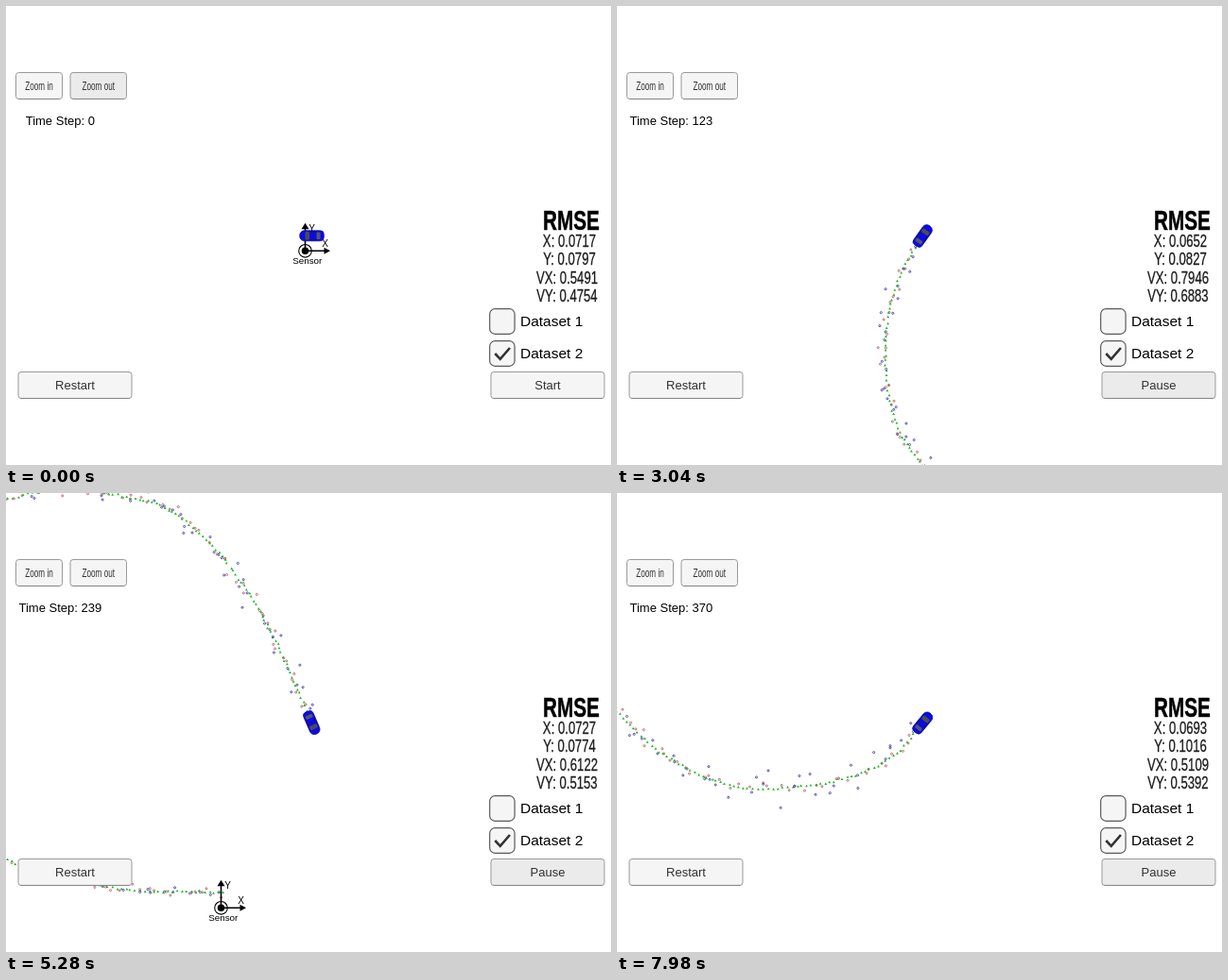
Write an HTML page with a canvas that moves like this. It is 640 by 486 pixels and loops after 8000 ms.

```html
<!DOCTYPE html>
<html lang="en">
<head>
<meta charset="utf-8">
<title>Sensor fusion tracker</title>
<style>
html, body { margin: 0; width: 100%; height: 100%; overflow: hidden; background: #fff; }
canvas { display: block; width: 640px; height: 486px; }
</style>
</head>
<body>
<canvas id="stage" width="640" height="486"></canvas>
<script>
const ctx = document.getElementById('stage').getContext('2d');
const LOOP = 8000, LAST = 370, CAR = [323.5, 243.3], INK = '#323232';
const FONT = '"Liberation Sans", Arial, sans-serif';

// Read-outs: time in ms, step, then errors in x, y, vx, vy
const READINGS = [
  [460, 0, .04, .06, 1.35, 1.15],
  [2120, 78, .0597, .0850, .9001, .7832],
  [3960, 168, .0707, .0804, .6893, .5937],
  [5280, 239, .0727, .0774, .6122, .5153],
  [5960, 272, .0724, .0775, .5790, .4873],
  [7120, 325, .0707, .0872, .5371, .4902],
  [7980, LAST, .0693, .1016, .5109, .5392]
];
const IDLE = [.0717, .0797, .5491, .4754];

// Bends of the road: step, then position relative to the sensor
const BENDS = [
  [0, 7, -16], [26, -120, -22], [49, -230, -54], [78, -337, -146], [100, -357, -256],
  [119, -329, -346], [138, -262, -415], [155, -179, -443], [168, -114, -438],
  [183, -48, -417.5], [206, 27, -337], [239, 96, -196], [272, 152, -46], [293, 206, 45],
  [308, 260, 100], [325, 334, 136], [336, 391, 139], [350, 459, 128], [361, 508, 105], [LAST, 539, 70]
];

const lerp = (a, b, u) => a + (b - a) * u;
const clamp01 = u => Math.max(0, Math.min(1, u));

function spanAt(keys, at) {
  let i = 0;
  while (i < keys.length - 2 && at > keys[i + 1][0]) i++;
  const [start, end] = [keys[i][0], keys[i + 1][0]];
  return { i, u: clamp01((at - start) / (end - start)), length: end - start };
}

function reading(t, col) {
  const { i, u } = spanAt(READINGS, t);
  return lerp(READINGS[i][col], READINGS[i + 1][col], u);
}

function slope(i, col) {
  const a = BENDS[Math.max(0, i - 1)], b = BENDS[Math.min(BENDS.length - 1, i + 1)];
  return (b[col] - a[col]) / (b[0] - a[0]);
}

// Cubic Hermite curve through the bends
function place(step) {
  const { i, u, length } = spanAt(BENDS, step), v = 1 - u;
  return [1, 2].map(col =>
    v * v * (1 + 2 * u) * BENDS[i][col] + u * u * (1 + 2 * v) * BENDS[i + 1][col] +
    length * u * v * (v * slope(i, col) - u * slope(i + 1, col)));
}

let seed = 20177;
function random() {
  seed = (seed * 16807) % 2147483647;
  return seed / 2147483647;
}
const noise = sd => (random() + random() + random() + random() - 2) * 1.73 * sd;

// Laser readings scatter in x and y, radar readings in range and bearing
function sense([x, y], k) {
  const est = [x + noise(.6), y + noise(.6)];
  if (k % 2) return { est, hit: [x + noise(3.2), y + noise(3.2)], color: '#b0505f' };
  const range = Math.hypot(x, y) + noise(4.5), angle = Math.atan2(y, x) + noise(.022);
  return { est, hit: [range * Math.cos(angle), range * Math.sin(angle)], color: '#2c2aa4' };
}

const marks = Array.from({ length: LAST + 1 }, (_, k) => sense(place(k), k));

function text(str, x, baseline, size, { align = 'center', color = '#000', weight = '', squeeze = 1, stroke = 0 } = {}) {
  ctx.save();
  ctx.translate(x, baseline);
  ctx.scale(squeeze, 1);
  ctx.font = `${weight} ${size}px ${FONT}`;
  ctx.textAlign = align;
  ctx.fillStyle = ctx.strokeStyle = color;
  ctx.fillText(str, 0, 0);
  if (stroke) {
    ctx.lineWidth = stroke;
    ctx.strokeText(str, 0, 0);
  }
  ctx.restore();
}

function box(x, y, w, h, r, fill, stroke, width = 1) {
  ctx.beginPath();
  ctx.roundRect(x, y, w, h, r);
  ctx.fillStyle = fill;
  ctx.fill();
  if (!stroke) return;
  ctx.strokeStyle = stroke;
  ctx.lineWidth = width;
  ctx.stroke();
}

function line(points, width, color = '#000') {
  ctx.beginPath();
  points.forEach(([x, y]) => ctx.lineTo(x, y));
  ctx.strokeStyle = color;
  ctx.lineWidth = width;
  ctx.stroke();
}

function poly(points, fill) {
  ctx.beginPath();
  points.forEach(([x, y]) => ctx.lineTo(x, y));
  ctx.fillStyle = fill;
  ctx.fill();
}

function ring(x, y, r, width, color = '#000') {
  ctx.beginPath();
  ctx.arc(x, y, r, 0, Math.PI * 2);
  ctx.strokeStyle = color;
  ctx.lineWidth = width;
  ctx.stroke();
}

function drawTrail(step, ox, oy) {
  for (const { est, hit, color } of marks.slice(1, step + 1)) {
    ring(hit[0] + ox, hit[1] + oy, 1.05, .8, color);
    const x = est[0] + ox, y = est[1] + oy;
    poly([[x - 1.4, y + 1.1], [x, y - 1.4], [x + 1.4, y + 1.1]], '#22b422');
  }
}

function drawSensor(x, y) {
  ring(x, y, 6.8, 1.1);
  ring(x, y, 1.9, 3.8);
  line([[x, y - 24], [x, y], [x + 21, y]], 1.6);
  poly([[x - 4, y - 23], [x, y - 29.5], [x + 4, y - 23]], '#000');
  poly([[x + 20, y - 3.5], [x + 26.5, y], [x + 20, y + 3.5]], '#000');
  text('Y', x + 7, y - 20, 10);
  text('X', x + 21, y - 4, 10);
  text('Sensor', x + 2.3, y + 14.1, 9.8);
}

function drawCar(step) {
  const [x, y] = place(step), [px, py] = place(step - 2);
  ctx.save();
  ctx.translate(...CAR);
  ctx.rotate(step ? Math.atan2(y - py, x - px) : Math.PI);
  box(-12.8, -5.5, 25.6, 11, [4, 5, 5, 4], '#0c0ce0', '#0606a0', .7);
  box(-9, -3.8, 4, 7.6, 1, '#55566a');
  box(2.5, -4.2, 4.6, 8.4, 1.5, '#4c4c50');
  for (const side of [-4.4, 4.4]) line([[-5, side], [2.5, side]], 1, '#101060');
  ctx.restore();
}

function button(label, x, y, w, h, shade, size = 13, squeeze = 1) {
  box(x + .5, y + .5, w - 1, h - 1, 3, `rgb(${shade},${shade},${shade})`, '#999');
  line([[x + 3, y + h - .6], [x + w - 3, y + h - .6]], .7, '#808080');
  text(label, x + w / 2, Math.floor(y + h / 2 + size * .36 + .5), size, { color: INK, squeeze });
}

function checkbox(label, y, checked) {
  box(511.7, y - 13.3, 26.4, 26.6, 5.5, '#f5f5f5', '#5a5a5a', 1.2);
  if (checked) line([[517.3, y], [522.8, y + 5.8], [533, y - 6]], 2.6, INK);
  text(label, 544, y + 5, 15.5, { align: 'left' });
}

function drawPanel(t, step) {
  const fade = (from, to, start) => Math.round(lerp(from, to, clamp01((t - start) / 100)));
  button('Zoom in', 10, 70, 50, 29, 245, 12, .68);
  button('Zoom out', 67.5, 70, 60.5, 29, fade(235, 245, 440), 12, .68);
  button('Restart', 12.5, 387, 121, 29, 245);
  button(t < 440 ? 'Start' : 'Pause', 512.5, 387, 121, 29, fade(245, 235, 20));
  text('Time Step: ' + step, 57.3, 126, 13);

  text('RMSE', 598, 237, 29, { weight: 'bold', squeeze: .715, stroke: .5 });
  ['X', 'Y', 'VX', 'VY'].forEach((name, i) => {
    const value = step ? reading(t, i + 2) : IDLE[i];
    const x = i < 2 ? 596 : 593.5, y = 255 + 19.5 * i;
    text(`${name}: ${value.toFixed(4)}`, x, Math.floor(y), 18, { color: '#1c1c1c', squeeze: .73, stroke: .3 });
  });
  checkbox('Dataset 1', 334, false);
  checkbox('Dataset 2', 368, true);
}

function draw(t) {
  const step = Math.floor(reading(t, 1) + .01);
  const [x, y] = place(step), ox = CAR[0] - x, oy = CAR[1] - y;
  ctx.fillStyle = '#fff';
  ctx.fillRect(0, 0, 640, 486);
  drawTrail(step, ox, oy);
  drawSensor(ox, oy);
  drawCar(step);
  drawPanel(t, step);
}

const began = performance.now();
function tick() {
  draw((performance.now() - began) % LOOP);
  requestAnimationFrame(tick);
}
tick();
</script>
</body>
</html>
```
